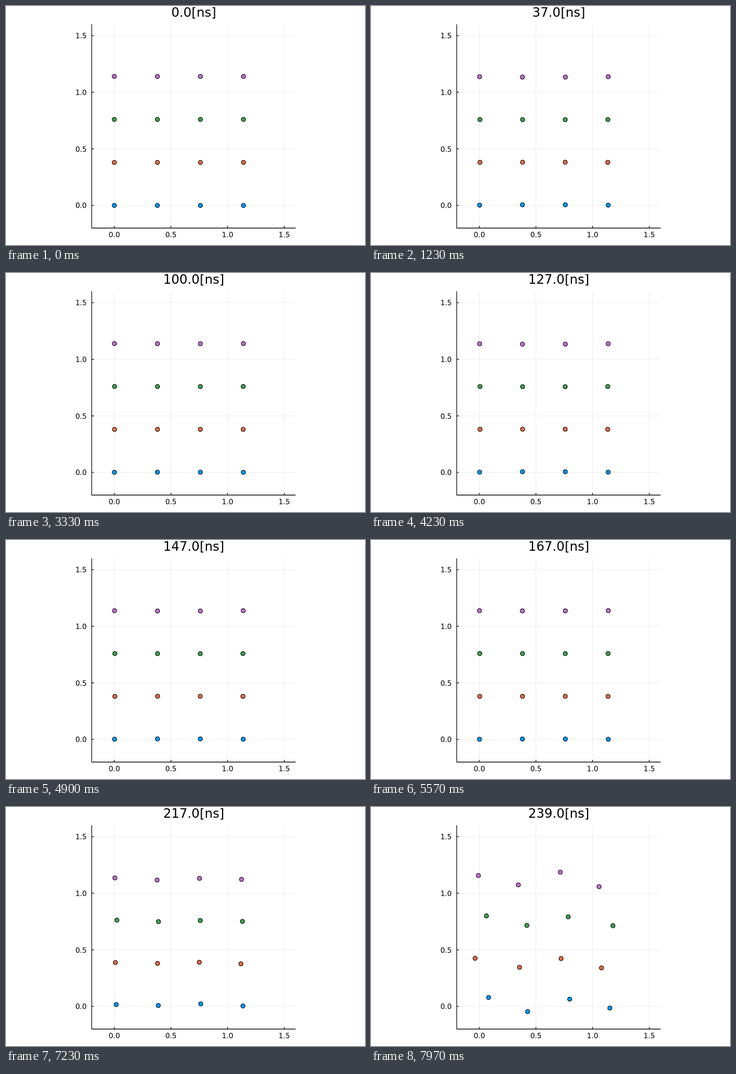
Write an HTML page that moves like this. It is 600 px wide and 400 px high and loops after 8 s.

```html
<!DOCTYPE html>
<html lang="en">
<head>
<meta charset="utf-8">
<title>Oscillating particle lattice</title>
<style>
  html, body { margin: 0; width: 100%; height: 100%; overflow: hidden; background: #fff; }
  svg { display: block; width: 600px; height: 400px; font-family: "DejaVu Sans", sans-serif; }
  .grid { stroke: #000; stroke-opacity: .07; }
  .axis { stroke: #000; stroke-width: 1.1; fill: none; }
  .label { font-size: 12px; }
  .title { font-size: 21.3px; text-anchor: middle; }
  circle { stroke: #000; stroke-width: 1; }
</style>
</head>
<body>
<svg id="stage" viewBox="0 0 600 400"></svg>
<script>
const LOOP = 8000, FRAMES = 240, LAST = FRAMES - 1;
const SCALE = 189.4, SPACING = 0.38;
const LEFT = 143.2, RIGHT = 484, TOP = 30.4, BOTTOM = 371.6;
const COLORS = ['#009afa', '#e26f47', '#3ea44e', '#c371d2'];

// Where the lattice has buckled to at the end of the loop, bottom row first.
const BUCKLED = [
  [[196.5, 318.8], [261.8, 342.4], [332.1, 321.6], [399.2, 336.5]],
  [[174.0, 253.2], [248.2, 268.3], [317.7, 253.7], [385.2, 269.3]],
  [[192.9, 182.2], [260.5, 198.2], [329.6, 183.8], [404.3, 198.7]],
  [[179.5, 114.7], [246.2, 130.3], [316.4, 109.0], [381.2, 133.3]]
];

const stage = document.getElementById('stage');
const toX = v => 181 + SCALE * v;
const toY = v => 333.8 - SCALE * v;

function add(tag, attributes, text = '') {
  const node = document.createElementNS('http://www.w3.org/2000/svg', tag);
  for (const name in attributes) node.setAttribute(name, attributes[name]);
  node.textContent = text;
  return stage.appendChild(node);
}

for (const v of [0, 0.5, 1, 1.5]) {
  const x = toX(v), y = toY(v), text = v.toFixed(1);
  add('path', { class: 'grid', d: `M${x} ${TOP}V${BOTTOM}M${LEFT} ${y}H${RIGHT}` });
  add('path', { class: 'axis', d: `M${x} ${BOTTOM}v-3.6M${LEFT} ${y}h3.6` });
  add('text', { class: 'label', x, y: 387.4, 'text-anchor': 'middle' }, text);
  add('text', { class: 'label', x: 135, y: y + 4.4, 'text-anchor': 'end' }, text);
}
add('path', { class: 'axis', d: `M${LEFT} ${TOP}V${BOTTOM}H${RIGHT}` });
const title = add('text', { class: 'title', x: 313.8, y: 18.3 });

const dots = COLORS.flatMap((fill, row) =>
  BUCKLED[row].map((end, col) => ({ row, col, end, node: add('circle', { r: 3.6, fill }) })));

// Inward pull along one axis; `across` is the index on the other axis.
function pull(index, across) {
  const outer = index % 3 === 0, border = across % 3 === 0;
  const amount = outer ? (border ? 0.73 : 1.68) : (border ? 0.26 : 0.55);
  return index < 2 ? amount : -amount;
}

function breathing({ row, col }, frame) {
  const phase = 1 - Math.cos(2 * Math.PI * frame / 20.48);
  return [
    toX(col * SPACING) + phase * pull(col, row),
    toY(row * SPACING) - phase * pull(row, col)
  ];
}

// The instability grows exponentially, then saturates.
const sech = frame => 1 / Math.cosh(0.13 * (frame - 238));
const buckling = frame => sech(frame) / sech(LAST);

function draw(now) {
  const frame = Math.min(LAST, Math.floor((now % LOOP + 4) * FRAMES / LOOP));
  const growth = buckling(frame);
  title.textContent = frame.toFixed(1) + '[ns]';
  for (const dot of dots) {
    const here = breathing(dot, frame), rest = breathing(dot, LAST);
    const [x, y] = here.map((p, i) => p + growth * (dot.end[i] - rest[i]));
    dot.node.setAttribute('cx', x);
    dot.node.setAttribute('cy', y);
  }
}

const start = performance.now();
function tick() {
  draw(performance.now() - start);
  requestAnimationFrame(tick);
}
tick();
</script>
</body>
</html>
```
